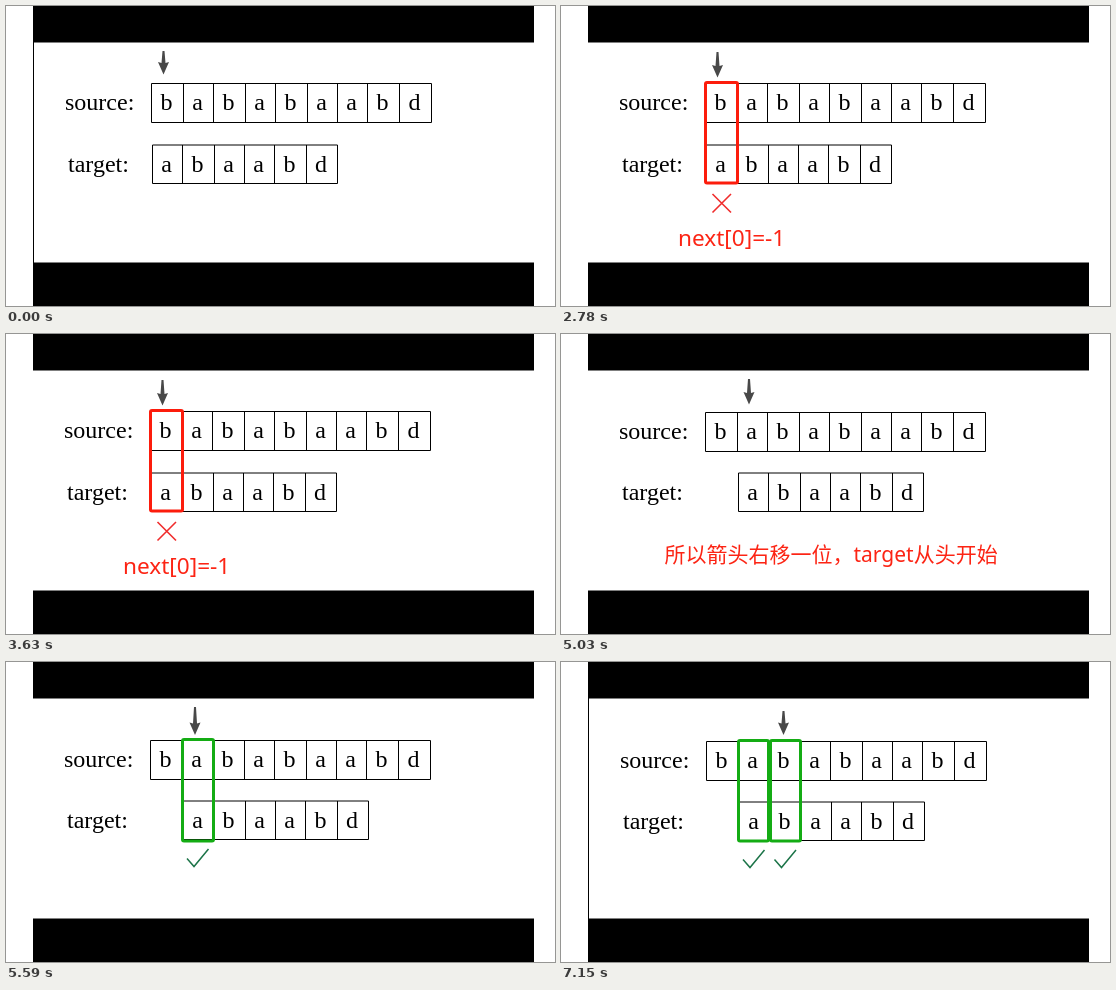
An HTML page that plays this animation: 549x300 px, repeating every 8 s.

```html
<!DOCTYPE html>
<html lang="zh-CN">
<head>
<meta charset="utf-8">
<title>String matching</title>
<style>
  html, body { margin: 0; width: 100%; height: 100%; overflow: hidden; background: #fff; }
  svg { display: block; width: 100vw; height: 100vh; }
  .serif { font: 24px "Liberation Serif", "Times New Roman", serif; }
  .mid { text-anchor: middle; }
  .note { font-family: "Noto Sans", "Noto Sans CJK SC", "Noto Sans CJK", sans-serif; fill: #fc2414; }
  .grid { fill: none; stroke: #000; stroke-width: 1; }
</style>
</head>
<body>
<svg id="stage" viewBox="0 0 549 300" xmlns="http://www.w3.org/2000/svg"></svg>
<script>
const RED = '#fc1c0c', GREEN = '#14ac14', TICK = '#1c7448';
const LOOP = 8000;
const SOURCE = 'babababd'.replace('babababd', 'bababaabd'), TARGET = 'abaabd';
const SOURCE_EDGES = [0, 32, 62, 94, 124, 156, 186, 216, 248, 280];
const TARGET_EDGES = [0, 30, 62, 92, 122, 154, 185];

// x: shift of the labels and source row; sy, ty: row tops; tx: target row left
// arrow: [centre x, top, tip]; boxes: [left, top, right, bottom]
const steps = [
  { at: 0, x: 1, sy: 77, tx: 146, ty: 138, arrow: [157.5, 45, 68.5], edge: 27 },
  { at: 1390, x: 0, sy: 77, tx: 145, ty: 138, arrow: [156.5, 46, 71.5], edge: 527,
    color: RED, boxes: [[144.5, 76.5, 176.5, 177]], cross: true },
  { at: 2780, x: 0, sy: 77, tx: 145, ty: 138, arrow: [156.5, 46, 71.5],
    color: RED, boxes: [[144.5, 76.5, 176.5, 177]], cross: true,
    note: ['next[0]=-1', 117, 240, 22.6] },
  { at: 4190, x: 0, sy: 78, tx: 177, ty: 138, arrow: [188, 45, 70.5],
    note: ['所以箭头右移一位，target从头开始', 103.5, 228, 21] },
  { at: 5590, x: 0, sy: 78, tx: 177, ty: 138, arrow: [189, 45, 73],
    color: GREEN, boxes: [[176.5, 77.5, 207.5, 179]], ticks: [[181, 187]] },
  { at: 7150, x: 1, sy: 79, tx: 178, ty: 139, arrow: [222.5, 49, 73],
    color: GREEN, boxes: [[177.5, 78.5, 207.5, 179], [209.5, 78.5, 239.5, 179]],
    ticks: [[182, 188], [213.5, 188]], edge: 27 }
];

const path = (d, color, width) =>
  `<path d="${d}" fill="none" stroke="${color}" stroke-width="${width}"/>`;

const text = (s, x, y, cls, size) =>
  `<text x="${x}" y="${y}" class="${cls}"${size ? ` style="font-size:${size}px"` : ''}>${s}</text>`;

function row(word, edges, left, top, height) {
  const width = edges[edges.length - 1];
  let d = `M${left + .5} ${top + .5}h${width}v${height}h${-width}z`;
  for (const e of edges.slice(1, -1)) d += `M${left + e + .5} ${top + .5}v${height}`;
  const letters = [...word].map((c, i) =>
    text(c, left + (edges[i] + edges[i + 1]) / 2 - .5, top + 27, 'serif mid'));
  return `<path class="grid" d="${d}"/>` + letters.join('');
}

function arrow([x, top, tip]) {
  const neck = tip - 12.5;
  return `<path fill="#484848" d="M${x - 1} ${top}h2L${x + 2} ${neck + 1}L${x + 5.5} ${neck}` +
    `L${x} ${tip}L${x - 5.5} ${neck}L${x - 2} ${neck + 1}z"/>`;
}

const box = ([l, t, r, b], color) =>
  `<rect x="${l}" y="${t}" width="${r - l}" height="${b - t}" rx="1.5" fill="none" stroke="${color}" stroke-width="3"/>`;

function scene(s) {
  let out = '<rect width="549" height="300" fill="#fff"/>' +
    '<path d="M27 0h501v36.5h-501zM27 256.5h501v43.5h-501z"/>';
  if (s.edge) out += path(`M${s.edge + .5} 36v221`, '#000', 1);
  out += text('source:', 58 + s.x, s.sy + 27, 'serif');
  out += text('target:', 61 + s.x, s.ty + 28, 'serif');
  out += row(SOURCE, SOURCE_EDGES, 144 + s.x, s.sy, 39);
  out += row(TARGET, TARGET_EDGES, s.tx, s.ty + .5, 38.5);
  out += arrow(s.arrow);
  for (const b of s.boxes || []) out += box(b, s.color);
  if (s.cross) out += path('M151.5 188l18.5 18.5M170 188l-18.5 18.5', '#f02c2c', 1.6);
  for (const [x, y] of s.ticks || []) out += path(`M${x} ${y + 9.5}l7 8l14.5 -17.5`, TICK, 1.5);
  if (s.note) {
    const [words, x, y, size] = s.note;
    out += text(words, x, y, 'note', size);
  }
  return out;
}

const stage = document.getElementById('stage');
let shown = null;

function draw(time) {
  const t = time % LOOP;
  const step = steps.filter(s => s.at <= t).pop();
  if (step !== shown) {
    stage.innerHTML = scene(step);
    shown = step;
  }
}

const start = performance.now();
function tick() {
  draw(Math.max(0, performance.now() - start));
  requestAnimationFrame(tick);
}
tick();
</script>
</body>
</html>
```
